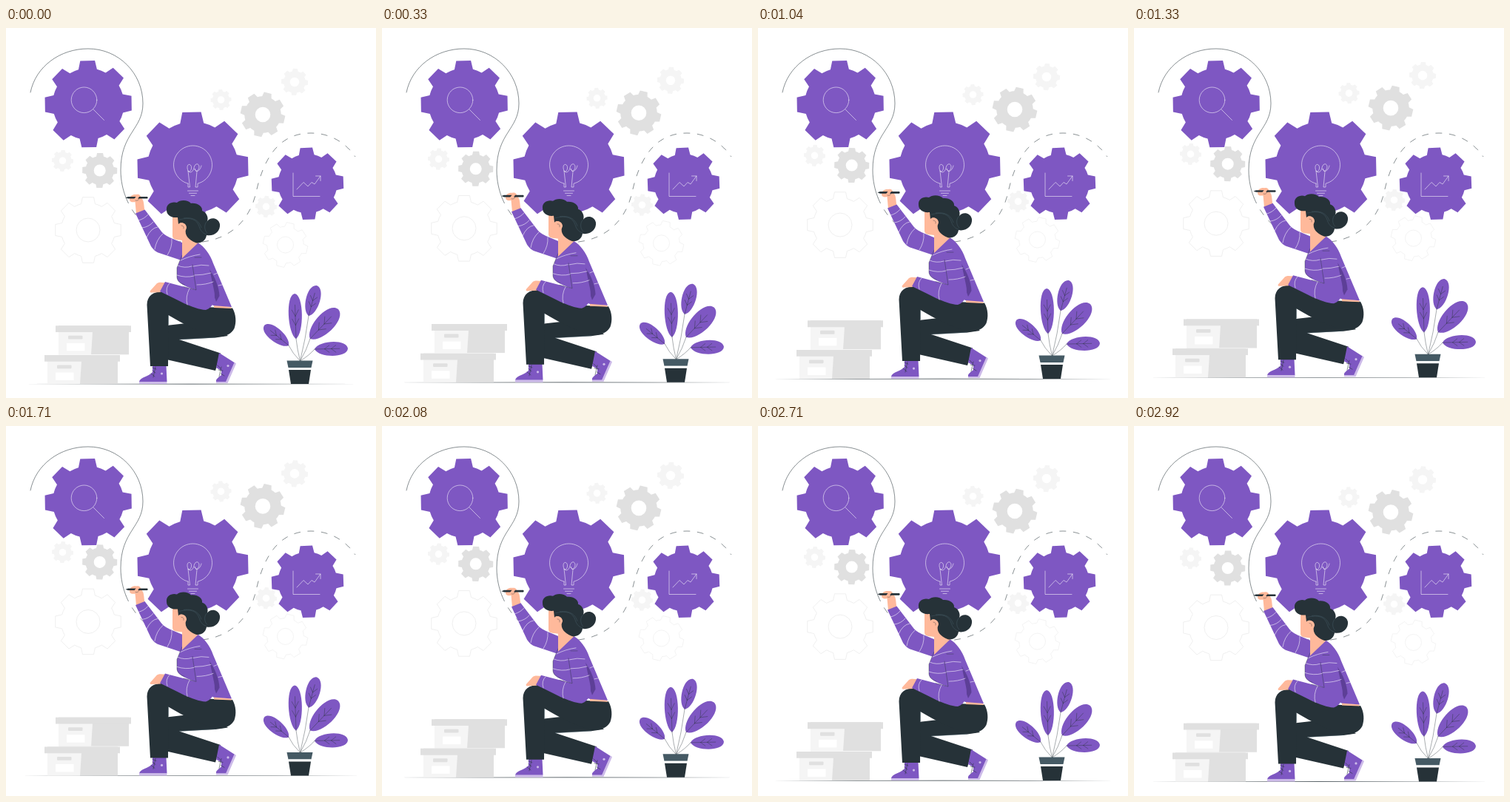
These frames come from a looping animation (500x500 px, 3000 ms). An HTML page:

```html
<!DOCTYPE html>
<html lang="en">
<head>
<meta charset="utf-8">
<title>Drawing the process</title>
<style>
  html, body { margin: 0; width: 100%; height: 100%; overflow: hidden; background: #fff; }
  svg { display: block; width: 100%; height: 100%; }
  .purple { fill: #7e57c2; }
  .dark { fill: #263238; }
  .skin { fill: #ffb99b; }
  .grey { fill: #e0e0e0; }
  .pale { fill: #f5f5f5; }
  .white { fill: #fff; }
  .sole { fill: #cdbbe9; }
  .line { fill: none; stroke: #263238; stroke-width: .55; stroke-linecap: round; stroke-linejoin: round; }
  .dashed { stroke-dasharray: 8.8 9.6; stroke-linecap: butt; }
  .thin { stroke-width: .4; }
  .icon { fill: none; stroke: #fff; stroke-width: .55; stroke-linecap: round; stroke-linejoin: round; }
  .stripes { stroke-width: .7; stroke-opacity: .8; }
  .sheen { fill: none; stroke: #455a64; stroke-width: .5; }
</style>
</head>
<body>
<svg viewBox="0 0 500 500">
  <g class="float">
    <g id="paleGears"></g>
    <path class="dark" d="M19 481.1Q250 480.4 481 481.1Q250 481.8 19 481.1Z"/>
    <g id="boxes"></g>
  </g>

  <g id="mainGears"></g>
  <path class="line" d="M33 87C40 52 73 28 111 28C152 28 185 61 185 102C185 137 155 142 155 192C155 206 158 219 162 229"/>
  <path class="line dashed" d="M162 229C174 260 205 290 250 290C300 290 329 262 338 222C347 181 366 142 412 142C438 142 459 155 472 174"/>
  <g class="icon">
    <circle cx="105.5" cy="97.3" r="17.3"/>
    <path d="M118 110L132.500 124.500"/>
    <path d="M246 210.200A26 26 0 1 1 259 210.200V215H256L258 194M246 210.200V215H248.500L246 193"/>
    <path d="M246 193C243 186 247 182 250 186C252 191 248 196 246 193C249 197 253 194 254 189C255 183 260 182 261 187C261 193 256 196 255 190C257 197 263 192 264 186"/>
    <path d="M245.500 220H259.500M247.500 223.300H257.500M250 226.500H255"/>
    <path d="M388 196V227.500H424M393 218L402 208.500L408 214L413 208.500L417 211L425 200M418.500 200H425V206.500"/>
  </g>

  <g class="float">
    <g id="plant"></g>

    <!-- far leg and shoes -->
    <path class="dark" d="M217 402L270 396L300 416L283 418.500L234 421L290 439.500L283 463L217 448Z"/>
    <path class="purple" d="M288 439L310 453L299 478H284C283 474 288 472 291 469L291 463L284 459Z"/>
    <path class="sole" d="M308.500 452L311 453.500L299.500 480H284V478H297Z"/>
    <path class="purple" d="M198 456H216.500L217.500 478H180C181 472 193 471 198 465Z"/>
    <path class="sole" d="M180 478H217.500V481H180Z"/>
    <path class="line" d="M198 459L203 461M198 463L202 466M196 467L201 471M202 458L199 472M286 456L290 460M287 462L293 463M290 467L295 470M291 458L288 471"/>
    <circle class="sole" cx="210.500" cy="467" r="1.600"/>
    <circle class="sole" cx="300" cy="456.500" r="1.600"/>

    <!-- raised hand and sleeve -->
    <path class="skin" d="M167 232C167 227 171 224.500 176 225C181 224 182 227 183 230C187 233 186 240 187.500 247L176 251L174.500 235C171 236 167 235 167 232Z"/>
    <path class="dark" d="M161.500 229.300L165 228H191Q192.500 229.300 191 230.600H165Z"/>
    <path class="skin" d="M171 234L177 226L180 228L175 235Z"/>
    <path class="line thin" d="M175 233C178 234 180 232 180 230"/>
    <path class="purple" d="M175 250.500L187.500 245.500L207 271C211 277 215 280 221 283L240 291V315L207 304C201 302 199 299 196 295Z"/>

    <!-- near leg -->
    <path class="dark" d="M190.500 374C190.500 362 199 356 212 356L268 377L306 378.500C311 387 311.500 398 308.500 406C304.500 414 295 418 283 417C263 412 240 400 219.500 388L219 457H195Z"/>
    <path class="sheen" d="M219.500 388V401M234 421L283 418"/>
    <path class="skin" d="M281 374L304 377L305 379L281 378Z"/>

    <!-- torso -->
    <path class="purple" d="M238 290L259 290C268 295 276 306 280 318L305 377L280 375L256 354C245 350 231 345 231 337V324L238 307Z"/>
    <path class="line thin" d="M238 307L231 324V337C232 343 236 345 241 347"/>
    <path fill="#5d3f97" d="M275 326C282 336 288 350 288.500 362L284 370L277 350Z"/>
    <path class="skin" d="M195 355L204 345C207 343 211 344 215 344L209 357L198 357.500C195 358 194 357 195 355Z"/>
    <path class="purple" d="M215 343L257 354L250 313C259 307 270 308 273 316L281 354C284 367 280 378 270 381C252 380 230 366 208 356Z"/>
    <path class="line thin" d="M252 320L257 354L240 349.500M255 310H264"/>
    <path class="icon stripes" d="M179 260Q187 258 192 252M184 270Q193 269 199 262M190 283Q196 270 205 269M201 299Q203 286 212 278M218 307Q225 296 224 285
      M236 314Q248 308 262 306M232 321Q241 325 251 322M253 322Q264 319 274 321M231 334Q243 338 254 335M255 334Q266 334 277 331M258 347Q270 347 280 343
      M281 333L286 331M287 348L292 347
      M221 345Q215 351 218 360M248 352Q242 363 245 374"/>

    <!-- head -->
    <path class="skin" d="M225 252V281C225 285 228 286 238 287V311L260 290L250 255Z"/>
    <path class="dark" d="M217 246C216 238 224 234 231 236C235 232 246 232 250 237C258 236 266 241 265 247C271 249 274 256 272 261C276 255 287 256 289 265C290 275 281 282 271 280C270 288 262 292 256 290C247 286 241 281 243 271C243 264 237 261 233 265L232 256C222 257 217 252 217 246Z"/>
    <path class="skin" d="M234 264C239 262 244 265 244 270C243 275 239 276 237 275Z"/>
    <path class="line thin" d="M237 267Q241 267 240 271"/>
    <path class="sheen" d="M234 259C250 255 258 259 261 268C263 275 267 278 271 279M240 257C256 255 262 263 264 270M272 261C267 265 268 274 272 277"/>
  </g>
</svg>

<script>
const PERIOD = 3000, LIFT = 10;
const $ = selector => document.querySelector(selector);
const polar = (cx, cy, r, deg) => {
  const a = deg * Math.PI / 180;
  return `${(cx + r * Math.cos(a)).toFixed(2)} ${(cy + r * Math.sin(a)).toFixed(2)}`;
};

// Eight tapered teeth joined by arcs, with an optional round hole.
function gear(cx, cy, r, turn, attrs, hole = 0) {
  const root = r * .825, tip = r * 1.014;
  let d = '';
  for (let i = 0; i < 8; i++) {
    const a = i * 45 + turn;
    d += i ? `A${root} ${root} 0 0 1 ` : 'M';
    d += [[root, -15], [tip, -9.6], [tip, 9.6], [root, 15]]
      .map(([rad, off]) => polar(cx, cy, rad, a + off)).join('L');
  }
  d += `A${root} ${root} 0 0 1 ${polar(cx, cy, root, turn - 15)}Z`;
  if (hole) d += `M${cx + hole} ${cy}a${hole} ${hole} 0 1 0 ${-2 * hole} 0a${hole} ${hole} 0 1 0 ${2 * hole} 0Z`;
  return `<path ${attrs} fill-rule="evenodd" d="${d}"/>`;
}

function box(x, y) {
  return `<path class="grey" d="M${x + 4} ${y}h95v39h-95z"/>
    <path class="pale" d="M${x + 4} ${y + 8}h46l-2 31h-44z"/>
    <path class="grey" d="M${x} ${y}h102v8.800h-102z"/>
    <rect class="grey" x="${x + 17}" y="${y + 13.500}" width="19.500" height="4.800" rx="1"/>
    <rect class="white" x="${x + 15}" y="${y + 23.500}" width="24.500" height="10.500"/>`;
}

// A leaf from its base to its rounded tip, with the stem running down to the pot.
function leaf(x0, y0, x1, y1, half) {
  const len = Math.hypot(x1 - x0, y1 - y0);
  const angle = Math.atan2(y1 - y0, x1 - x0) * 180 / Math.PI;
  const side = s => `${.12 * len} ${s * 1.25 * half} ${.97 * len} ${s * 1.42 * half} ${len} 0`;
  const veins = [.3, .5].map(k =>
    `M${k * len} 0l${.14 * len} ${-half * .5}M${k * len} 0l${.14 * len} ${half * .5}`).join('');
  return `<path class="line thin" d="M397.500 450Q${(x0 * 2 + 397) / 3} ${(y0 + 450) / 2} ${x0} ${y0}"/>
    <g transform="translate(${x0} ${y0}) rotate(${angle})">
      <path class="purple" d="M0 0C${side(-1)}M0 0C${side(1)}"/>
      <path class="line thin" d="M0 0H${.75 * len}${veins}"/>
    </g>`;
}

const grey = 'class="grey"', pale = 'class="pale"', purple = 'class="purple"';
const outline = color => `fill="none" stroke="${color}" stroke-width=".8"`;

$('#paleGears').innerHTML =
  gear(347, 117, 30, 13, grey, 10.3) +
  gear(126.7, 192.5, 23.5, 1, grey, 8) +
  gear(290.5, 97, 14, -3, pale, 4.8) +
  gear(390, 73, 18, 3, pale, 6.3) +
  gear(76.5, 179.3, 14.5, 3, pale, 4.8) +
  gear(351.5, 241.3, 14.5, 3, pale, 4.8) +
  gear(111, 273, 44.3, 0, outline('#ebebeb'), 16) +
  gear(377.5, 293, 30, 13, outline('#f0f0f0'), 11);

$('#mainGears').innerHTML =
  gear(111.2, 102.7, 58.5, -1, purple) +
  gear(252.5, 188.5, 74.8, -1.2, purple) +
  gear(407.5, 210.3, 48.5, -2, purple);

$('#boxes').innerHTML = box(67, 402.3) + box(52, 442);

$('#plant').innerHTML =
  leaf(392, 420, 390, 359, 9) +
  leaf(409, 389, 420, 348, 9.5) +
  leaf(411, 420, 449, 380, 12.5) +
  leaf(382, 429, 349, 402, 9) +
  leaf(417, 434, 462, 433, 9.5) +
  `<path fill="#455a64" d="M379.500 449.500H414.500L412.500 459H381.500Z"/>
   <path class="white" d="M381.500 459H412.500L412 462H382Z"/>
   <path class="dark" d="M382 462H412L409 481H385Z"/>`;

const floating = document.querySelectorAll('.float');
function render(ms) {
  const phase = ms % PERIOD / PERIOD;
  const y = -LIFT * (1 - Math.abs(1 - 2 * phase));
  floating.forEach(g => g.setAttribute('transform', `translate(0 ${y.toFixed(3)})`));
}

const start = performance.now();
function tick() {
  render(performance.now() - start);
  requestAnimationFrame(tick);
}
tick();
</script>
</body>
</html>
```
